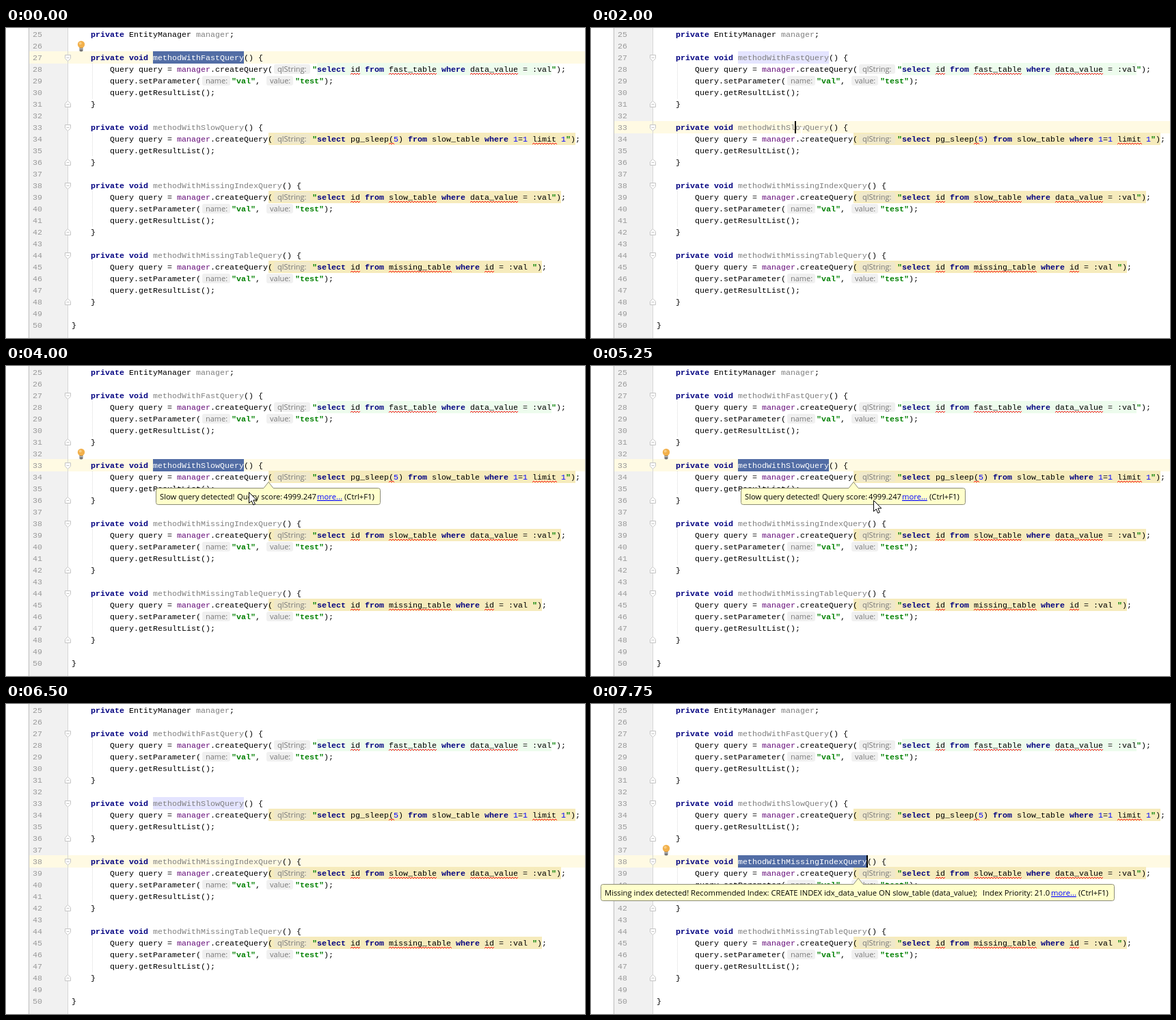
An HTML page for the animation above (8 s loop, 847x453 px).

```html
<!DOCTYPE html>
<html lang="en">
<head>
<meta charset="utf-8">
<title>Query inspection</title>
<style>
html, body { margin: 0; width: 100%; height: 100%; overflow: hidden; background: #fff; }
svg { display: block; width: 847px; height: 453px; }
text { white-space: pre; }
.code { font: 11.667px "Liberation Mono", "DejaVu Sans Mono", monospace; fill: #000; }
.keyword { font-weight: bold; fill: #000080; }
.string { font-weight: bold; fill: #008000; }
.field { fill: #660e7a; }
.number { fill: #0000ff; }
.unused { fill: #808080; }
.line-number { fill: #999; }
.hint { font: 11px "Open Sans", "Noto Sans", sans-serif; fill: #777; }
.tip text { font: 11.25px "Open Sans", "Noto Sans", sans-serif; fill: #000; }
.tip .link { fill: #0000ff; text-decoration: underline; }
.tip path { fill: #ffffcc; stroke: #8c8c78; }
.wave { fill: none; stroke: #f00; stroke-width: .9; }
.fold { fill: #fff; stroke: #c4c4c4; }
.guide { stroke: #dcdcdc; stroke-dasharray: 1 1; }
</style>
</head>
<body>
<svg id="stage" viewBox="0 0 847 453"></svg>
<script>
const LOOP = 8000, CELL = 7, ROW = 17, FIRST = 25;
const stage = document.getElementById('stage');
const rowTop = line => 1 + (line - FIRST) * ROW;
const rules = [];

// Hard-stepped looping track: [time in ms, value] pairs for one CSS property.
function track(id, property, steps) {
  const name = `${id}-${property}`;
  const keys = [...steps, [LOOP, steps[steps.length - 1][1]]]
    .map(([t, v]) => `${t / LOOP * 100}% { ${property}: ${v}; }`).join(' ');
  rules.push(`@keyframes ${name} { ${keys} }`,
    `#${id} { animation: ${name} ${LOOP}ms step-end infinite; }`);
}

const rect = (x, y, w, h, fill, extra = '') =>
  `<rect x="${x}" y="${y}" width="${w}" height="${h}" fill="${fill}" ${extra}/>`;
const text = (x, y, cls, body, extra = '') =>
  `<text x="${x}" y="${y}" class="${cls}" ${extra}>${body}</text>`;
// Row backgrounds reach one pixel into the row above.
const band = (line, x, w, fill, id = '') =>
  rect(x, rowTop(line) - 1, w, ROW + 1, fill, id && `id="${id}"`);

// Inline parameter hints: label, total advance, pill offset and width
const hints = {
  '@q': ['qlString:', 58, 2, 53],
  '@n': ['name:', 45, 2, 41],
  '@v': ['value:', 44, 2, 39]
};

const names = {
  methodWithFastQuery: 'fast',
  methodWithSlowQuery: 'slow',
  methodWithMissingIndexQuery: 'index'
};

const tokens = /(@[qnv]|~|"(?:val|test)"|"|\b(?:private|void|select|from|where)\b|method\w+|\bmanager\b|\d+)/;

function tokenClass(token) {
  if (token[0] === '"') return 'string';
  if (/^(private|void|select|from|where)$/.test(token)) return 'keyword';
  if (/^method/.test(token)) return 'unused';
  if (token === 'manager') return 'field';
  return /^\d+$/.test(token) ? 'number' : '';
}

function wave(from, to, y) {
  let d = `M${from} ${y}`;
  for (let x = from, up = true; x < to; x += 2, up = !up) d += `l2 ${up ? -2 : 2}`;
  return `<path class="wave" d="${d}"/>`;
}

// "~" toggles an error underline, "@" inserts a hint.
function codeLine(line, x, source, warned) {
  const top = rowTop(line);
  let out = '', waveStart = null;
  for (const token of source.split(tokens)) {
    if (!token) continue;
    if (token === '~') {
      if (waveStart === null) waveStart = x;
      else { out += wave(waveStart, x, top + 16); waveStart = null; }
    } else if (hints[token]) {
      const [label, advance, dx, width] = hints[token];
      out += rect(x + dx, top + 1, width, 14, warned ? '#efe8cb' : '#f0f0f0', 'rx="3"')
        + text(x + dx + 5, top + 11.5, 'hint', label);
      x += advance;
    } else {
      const width = token.length * CELL, id = names[token];
      if (id) out += band(line, x, width, 'transparent', `${id}-mark`);
      const cls = line === FIRST && token === 'manager' ? 'unused' : tokenClass(token);
      if (token.trim()) out += text(x, top + 12, `code ${cls}`, token, id ? `id="${id}-name"` : '');
      x += width;
    }
  }
  return out;
}

function method(line, name, sql, hasParameter, warnedTo) {
  const end = line + (hasParameter ? 4 : 3);
  let out = `<path class="guide" d="M126.5 ${rowTop(line + 1)}V${rowTop(end)}"/>`;
  out += warnedTo ? band(line + 1, 384, warnedTo - 384, '#f6ebbc')
    : band(line + 1, 455, 343, '#edfced');
  out += codeLine(line, 124, `private void ${name}() {`);
  out += codeLine(line + 1, 152, `Query query = manager.createQuery(@q"${sql}");`, warnedTo);
  if (hasParameter) out += codeLine(line + 2, 152, 'query.setParameter(@n"val", @v"test");');
  out += codeLine(end - 1, 152, 'query.getResultList();') + codeLine(end, 124, '}');
  const a = rowTop(line) + 4.5, b = rowTop(end) + 12.5;
  return out
    + `<path class="fold" d="M86.5 ${a}h8v5l-4 4l-4 -4zM88.5 ${a + 4}h4"/>`
    + `<path class="fold" d="M86.5 ${b}h8v-5l-4 -4l-4 4zM88.5 ${b - 4}h4"/>`;
}

// Each part of the message is an [x, text] pair.
function tooltip(id, x, y, width, tipX, parts, linkX) {
  const h = 24, r = 3, w = width - 2 * r;
  const shape = `M${x + r} ${y}H${tipX - 7}L${tipX} ${y - 9}L${tipX + 7} ${y}H${x + r + w}`
    + `q${r} 0 ${r} ${r}v${h - 2 * r}q0 ${r} ${-r} ${r}h${-w}q${-r} 0 ${-r} ${-r}v${2 * r - h}q0 ${-r} ${r} ${-r}z`;
  const base = y + 16.5;
  return `<g class="tip" id="${id}"><path d="${shape}"/>`
    + parts.map(([partX, body]) => text(partX, base, '', body)).join('')
    + text(linkX, base, 'link', 'more...')
    + text(linkX + 40, base, '', '(Ctrl+F1)') + '</g>';
}

let scene = rect(33, 0, 57, 453, '#f1f1f1')
  + rect(33, 0, 1, 453, '#bcbcbc')
  + band(27, 34, 813, '#fffae3', 'caret-row')
  + rect(90, 0, 1, 453, '#d6d6d6');

for (let n = FIRST; n <= 50; n++) scene += text(39, rowTop(n) + 12, 'code line-number', n);

scene += codeLine(25, 124, 'private EntityManager manager;')
  + method(27, 'methodWithFastQuery', 'select ~id~ from ~fast_table~ where ~data_value~ = :val', true)
  + method(33, 'methodWithSlowQuery', 'select pg_sleep~(~5) from slow_table where 1=1 ~limit~ 1', false, 833)
  + method(38, 'methodWithMissingIndexQuery', 'select ~id~ from ~slow_table~ where ~data_value~ = :val', true, 812)
  + method(44, 'methodWithMissingTableQuery', 'select ~id~ from ~missing_table~ where ~id~ = :val ', true, 784)
  + codeLine(50, 96, '}');

scene += `<g id="bulb-shown"><g id="bulb">
  <path d="M107.5 28h5v5.5q-2.5 2 -5 0z" fill="#777"/>
  <path d="M107.5 30.5h5" stroke="#ccc"/>
  <circle cx="110" cy="24" r="5.2" fill="#f2b04b"/>
  <circle cx="108.7" cy="22.5" r="2" fill="#f8cd83"/></g></g>`
  + band(33, 298, 2, '#000', 'caret-click')
  + band(38, 403, 2, '#000', 'caret-end')
  + tooltip('slow-tip', 219.5, 178.5, 328, 384,
    [[225, 'Slow query detected!'], [338, 'Query score:'], [406, '4999.247']], 455)
  + tooltip('index-tip', 14.5, 263.5, 751, 391,
    [[20, 'Missing index detected! Recommended Index: CREATE INDEX idx_data_value ON slow_table (data_value);'],
      [573, 'Index Priority: 21.0']], 673)
  + `<g id="beam"><path d="M-3 -8h6M0 -8v16M-3 8h6" stroke="#fff" stroke-width="2"/></g>
  <g id="arrow"><path d="M.5 .5v16l3.7 -3.5l2.6 6l2.6 -1.2l-2.6 -5.8h5z" fill="#fff" stroke="#000"/></g>`;

stage.innerHTML = scene;

const move = (x, y) => `translate(${x}px, ${y}px)`;
const away = move(-50, -50);
const SELECTED = '#526da5', USAGE = '#e4e4ff', CLEAR = 'transparent', GRAY = '#808080';

track('caret-row', 'transform', [[0, move(0, 0)], [2000, move(0, 102)], [6500, move(0, 187)]]);
track('bulb', 'transform', [[0, move(0, 0)], [2500, move(0, 102)], [7000, move(0, 187)]]);
track('bulb-shown', 'opacity', [[0, 1], [2000, 0], [2500, 1], [6500, 0], [7000, 1]]);

track('fast-mark', 'fill', [[0, SELECTED], [2000, USAGE], [2250, CLEAR]]);
track('fast-name', 'fill', [[0, '#fff'], [2000, GRAY]]);
track('slow-mark', 'fill', [[0, CLEAR], [2250, SELECTED], [6500, USAGE], [6750, CLEAR]]);
track('slow-name', 'fill', [[0, GRAY], [2250, '#fff'], [6500, GRAY]]);
track('index-mark', 'fill', [[0, CLEAR], [6750, SELECTED]]);
track('index-name', 'fill', [[0, GRAY], [6750, '#fff']]);

track('caret-click', 'opacity', [[0, 0], [2000, 1], [2250, 0]]);
track('caret-end', 'opacity', [[0, 0], [7750, 1]]);
track('slow-tip', 'opacity', [[0, 0], [2750, .5], [3000, 1], [5500, 0]]);
track('index-tip', 'opacity', [[0, 0], [7500, .5], [7750, 1]]);

track('beam', 'transform', [[0, away], [1250, move(340, 326)], [1500, move(325, 240)],
  [1750, move(312, 165)], [2000, move(308, 154)], [2500, away],
  [6000, move(340, 218)], [6250, move(308, 230)], [6500, away],
  [7250, move(410, 262)], [7500, away]]);
track('arrow', 'transform', [[0, away], [3750, move(300, 183)], [4000, move(355, 184)],
  [4250, move(386, 186)], [4500, move(404, 187)], [4750, move(411, 191)],
  [5000, move(414, 195)], [5250, move(413, 196)], [5500, away]]);

const sheet = document.createElement('style');
sheet.textContent = rules.join('\n');
document.head.append(sheet);
</script>
</body>
</html>
```
